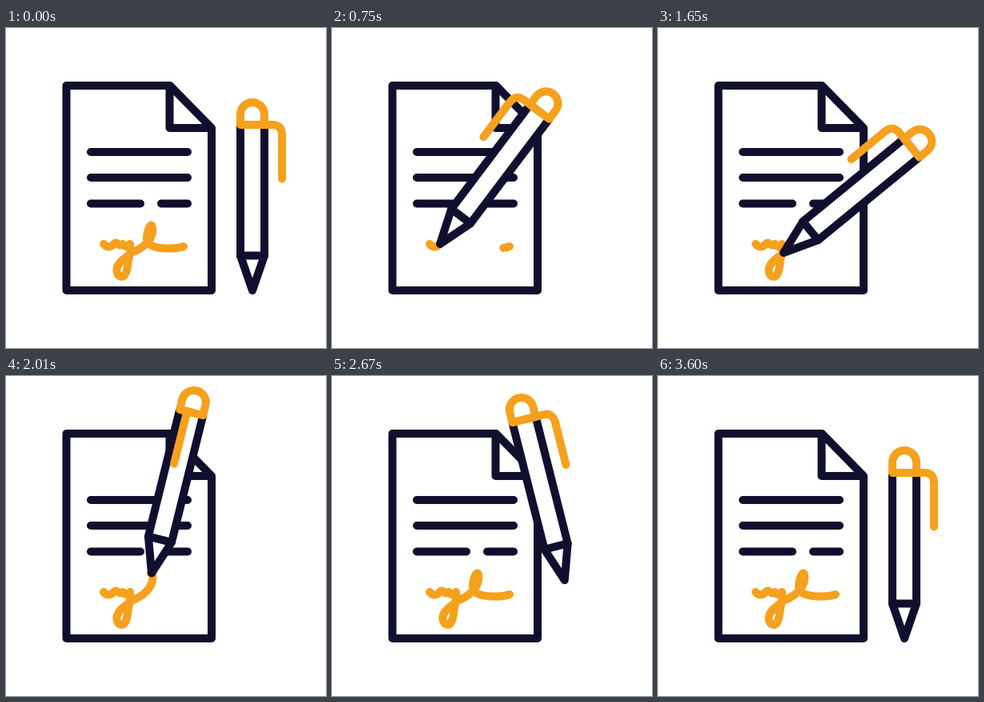
An HTML page for the animation above (5.63 s loop, 400 by 400 pixels).

```html
<!DOCTYPE html>
<html lang="en">
<head>
<meta charset="utf-8">
<style>
  html, body { margin: 0; width: 100%; height: 100%; overflow: hidden; background: #fff; }
  svg { display: block; width: 100%; height: 100%; }
  path { fill: none; stroke-width: 10; stroke-linecap: round; stroke-linejoin: round; }
  .navy { stroke: #110f2e; }
  .gold { stroke: #f5a11e; }
  .solid { fill: #fff; }
</style>
</head>
<body>
<svg viewBox="0 0 400 400">
  <path class="navy" d="M205 72H75.5V328H257V125L205 72M204.500 72V125H257"/>
  <path class="navy" d="M106 155H227M106 187H227M106 219.500H168M194 219.500H227"/>
  <path class="gold" id="oldInk"/>
  <path class="gold" id="newInk"/>
  <g id="pen">
    <path class="navy solid" d="M-15 -206V-43.500L0 0L15 -43.500V-206"/>
    <path class="navy" d="M-15 -43.500H15"/>
    <path class="gold solid" d="M-15 -207V-220A15 15 0 0 1 15 -220V-207Z"/>
    <path class="gold" id="clip"/>
  </g>
</svg>
<script>
const LOOP = 5630, STEP = 30, WRITE_START = 570, WRITE_END = 2300;
const el = id => document.getElementById(id);
const [oldInk, newInk, pen, clip] = ['oldInk', 'newInk', 'pen', 'clip'].map(el);

// Signature strokes; the pen reaches the end of each one at a known time.
const start = 'M122 270';
const strokes = [
  { end: 750, d: 'Q128 277 135 270' },
  { end: 1230, d: 'Q137 267 140 270Q143 273 146 270Q150 276 155 270C156 277 155 283 153 290' },
  { end: 1650, d: 'C152 300 150 311 145 311C140 311 138 306 138.500 301C140 292 150 287 157 281' },
  { end: 2010, d: 'C169 276 180 268 183 256Q184 247 182 246.500' },
  { end: WRITE_END, d: 'C179 246 176 256 176 263C176 272 188 275 200 275.500Q214 276 222 273' }
];

// Smooth interpolation through [time, value] keys without extra overshoot.
function track(keys) {
  const n = keys.length;
  const slope = i => (keys[i + 1][1] - keys[i][1]) / (keys[i + 1][0] - keys[i][0]);
  const tangent = keys.map((k, i) => {
    if (i === 0 || i === n - 1) return 0;
    const a = slope(i - 1), b = slope(i);
    return a * b <= 0 ? 0 : 2 * a * b / (a + b);
  });
  return t => {
    if (t <= keys[0][0]) return keys[0][1];
    if (t >= keys[n - 1][0]) return keys[n - 1][1];
    let i = 0;
    while (t >= keys[i + 1][0]) i++;
    const [t0, v0] = keys[i], [t1, v1] = keys[i + 1];
    const h = t1 - t0, u = (t - t0) / h, w = 1 - u;
    return v0 * (1 + 2 * u) * w * w + tangent[i] * h * u * w * w
         + v1 * u * u * (3 - 2 * u) - tangent[i + 1] * h * u * u * w;
  };
}

let outline = start;
const marks = [[WRITE_START, 0]];
for (const { end, d } of strokes) {
  outline += d;
  newInk.setAttribute('d', outline);
  marks.push([end, newInk.getTotalLength()]);
}
oldInk.setAttribute('d', outline);
const total = newInk.getTotalLength();

function inkLength(t) {
  if (t <= WRITE_START) return 0;
  if (t >= WRITE_END) return total;
  const i = marks.findIndex(m => t < m[0]);
  const [t0, a] = marks[i - 1], [t1, b] = marks[i];
  return a + (b - a) * (t - t0) / (t1 - t0);
}

const tipIn = {
  x: track([[0, 308], [430, 106], [570, 122]]),
  y: track([[0, 328], [430, 272], [570, 270]])
};
const tipOut = {
  x: track([[2300, 222], [2640, 291], [2850, 287], [3270, 310], [3420, 308]]),
  y: track([[2300, 273], [2640, 255], [2850, 263], [3270, 335], [3420, 328]])
};
const angle = track([
  [0, 0], [120, 16], [240, 31], [420, 43], [570, 40], [750, 37], [870, 34.5],
  [1230, 44.6], [1650, 50.7], [1710, 54], [2010, 13.9], [2300, -14.2],
  [2850, -14.2], [3270, 2], [3420, 1.5], [3600, 0]
]);
const flip = track([[0, 1], [480, -1], [1740, -1], [2010, -0.15], [2340, 1]]);

function tipAt(t, drawn) {
  if (t >= WRITE_START && t < WRITE_END) return newInk.getPointAtLength(drawn);
  const move = t < WRITE_START ? tipIn : tipOut;
  return { x: move.x(t), y: move.y(t) };
}

function showInk(path, from, to) {
  path.style.display = to - from > 0.1 ? '' : 'none';
  path.setAttribute('stroke-dasharray', `${to - from} ${total * 2}`);
  path.setAttribute('stroke-dashoffset', -from);
}

function draw(t) {
  const drawn = inkLength(t);
  const erased = total * Math.min(1, Math.max(0, t / 780));
  showInk(oldInk, erased, total);
  showInk(newInk, 0, drawn);

  const tip = tipAt(t, drawn), f = flip(t);
  pen.setAttribute('transform', `translate(${tip.x} ${tip.y}) rotate(${angle(t)})`);
  clip.setAttribute('d', `M0 -207H${25 * f}Q${37 * f} -207 ${37 * f} -194V-139.500`);
}

function tick() {
  const t = performance.now() % LOOP;
  draw(Math.floor(t / STEP) * STEP);
  requestAnimationFrame(tick);
}
tick();
</script>
</body>
</html>
```
